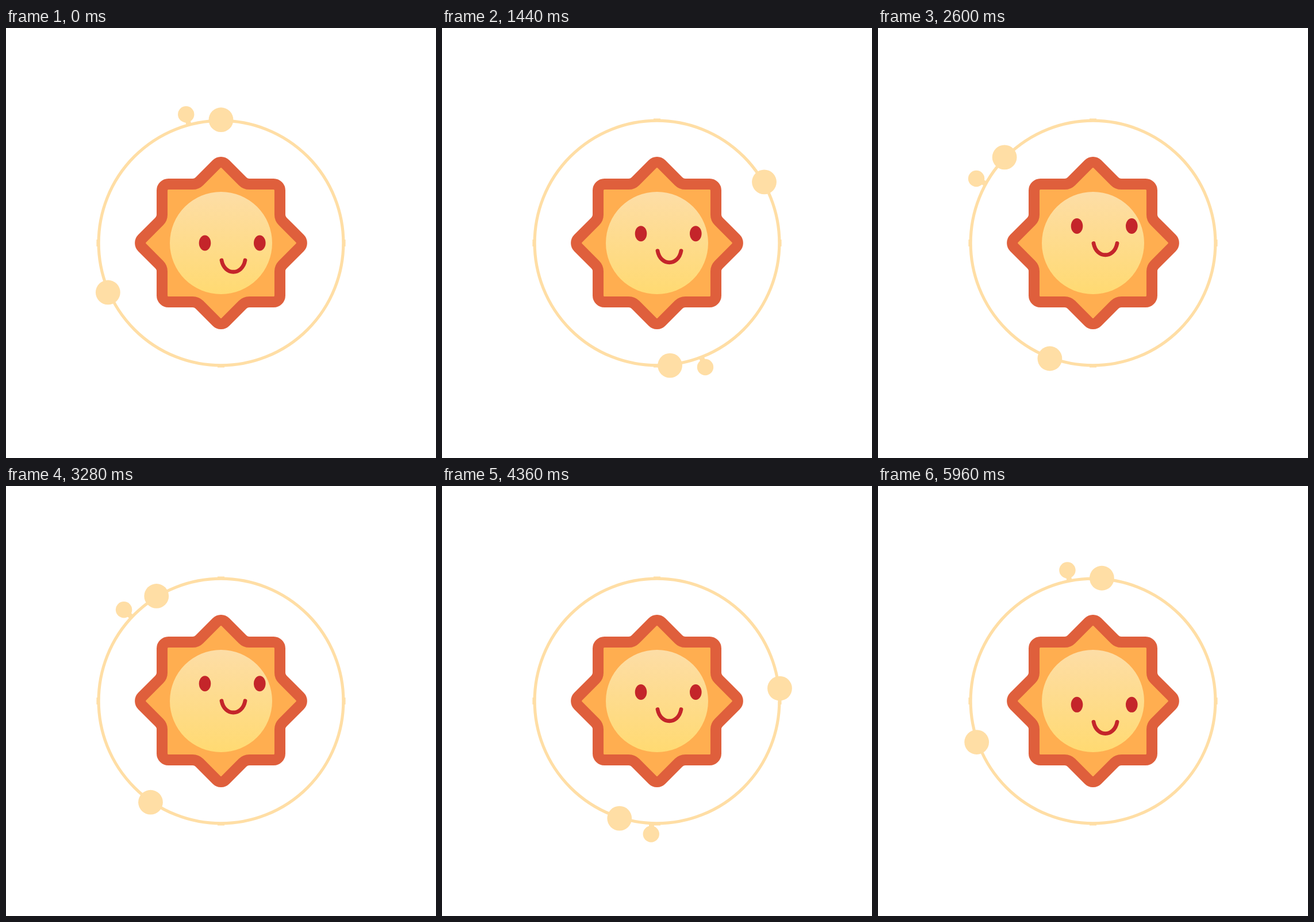
Recreate the animation shown at these times as an HTML page with a canvas. Size 748 px wide and 748 px high, loop 6000 ms.

```html
<!DOCTYPE html>
<html lang="en">
<head>
<meta charset="utf-8">
<title>Smiling sun</title>
<style>
  html, body { margin: 0; width: 100%; height: 100%; overflow: hidden; background: #fff; }
  canvas { display: block; }
</style>
</head>
<body>
<canvas id="stage" width="748" height="748"></canvas>
<script>
const ctx = document.getElementById('stage').getContext('2d');
const TAU = Math.PI * 2, LOOP = 6000, STEP = 40;
const CREAM = '#ffdea5', RED = '#c4252a';
const clamp = x => Math.min(1, Math.max(0, x));

// Eight-pointed star: sharp tips, softly filleted notches.
function makeStar() {
  const star = new Path2D();
  const vertex = i => {
    const r = i % 2 ? 100.65 : 131.5, a = i * TAU / 16;
    return [r * Math.cos(a), r * Math.sin(a)];
  };
  const [a, b] = [vertex(0), vertex(15)];
  star.moveTo((a[0] + b[0]) / 2, (a[1] + b[1]) / 2);
  for (let i = 0; i < 16; i++) star.arcTo(...vertex(i), ...vertex(i + 1), i % 2 ? 26 : 1.5);
  star.closePath();
  return star;
}

const star = makeStar();
const glow = ctx.createLinearGradient(0, -89, 0, 89);
glow.addColorStop(0, '#fddda6');
glow.addColorStop(1, '#ffda72');

function disc(x, y, rx, ry, color) {
  ctx.fillStyle = color;
  ctx.beginPath();
  ctx.ellipse(x, y, rx, ry, 0, 0, TAU);
  ctx.fill();
}

function ringArc(r, from, to, width) {
  ctx.lineWidth = width;
  ctx.beginPath();
  ctx.arc(0, 0, r, from, to);
  ctx.stroke();
}

function drawOrbit(turn) {
  ctx.strokeStyle = CREAM;
  ctx.lineCap = 'butt';
  ringArc(212.9, 0, TAU, 5.2);
  for (let i = 0; i < 4; i++) ringArc(213.8, i * TAU / 4 - 0.028, i * TAU / 4 + 0.028, 5.6);

  const planet = (degrees, dist, r) => {
    const a = (turn + degrees - 90) * TAU / 360;
    disc(dist * Math.cos(a), dist * Math.sin(a), r, r, CREAM);
    return a;
  };
  planet(0, 214.3, 21.4);
  planet(246.4, 214.6, 21.4);
  const a = planet(-15.2, 231.8, 14.2);
  ctx.lineWidth = 9;
  ctx.beginPath();
  ctx.moveTo(214 * Math.cos(a), 214 * Math.sin(a));
  ctx.lineTo(222 * Math.cos(a), 222 * Math.sin(a));
  ctx.stroke();
}

function drawSun() {
  ctx.lineJoin = 'round';
  ctx.lineWidth = 38;
  ctx.strokeStyle = '#df5f3c';
  ctx.stroke(star);
  ctx.fillStyle = '#ffae50';
  ctx.fill(star);
  disc(0, 0, 89, 89, glow);
}

function drawFace(y) {
  disc(-28, y, 10.3, 13.5, RED);
  disc(67.3, y, 10.3, 13.5, RED);
  ctx.strokeStyle = RED;
  ctx.lineWidth = 6.8;
  ctx.lineCap = 'round';
  ctx.beginPath();
  ctx.moveTo(1, y + 30);
  ctx.bezierCurveTo(6, y + 57, 37, y + 57, 42, y + 30);
  ctx.stroke();
}

function draw(now) {
  const t = Math.floor(now % LOOP / STEP) * STEP;
  const out = clamp(t / 2980), back = clamp((t - 3019) / 2975);
  ctx.setTransform(1, 0, 0, 1, 0, 0);
  ctx.fillStyle = '#fff';
  ctx.fillRect(0, 0, 748, 748);
  ctx.translate(374, 374);
  drawOrbit(360 * (out - back));
  drawSun();
  // The face ends lower than it starts, then jumps at the loop.
  drawFace(-33.8 * out + 40.6 * back);
}

let start;
function tick(now) {
  start ??= now;
  draw(now - start);
  requestAnimationFrame(tick);
}
draw(0);
requestAnimationFrame(tick);
</script>
</body>
</html>
```
